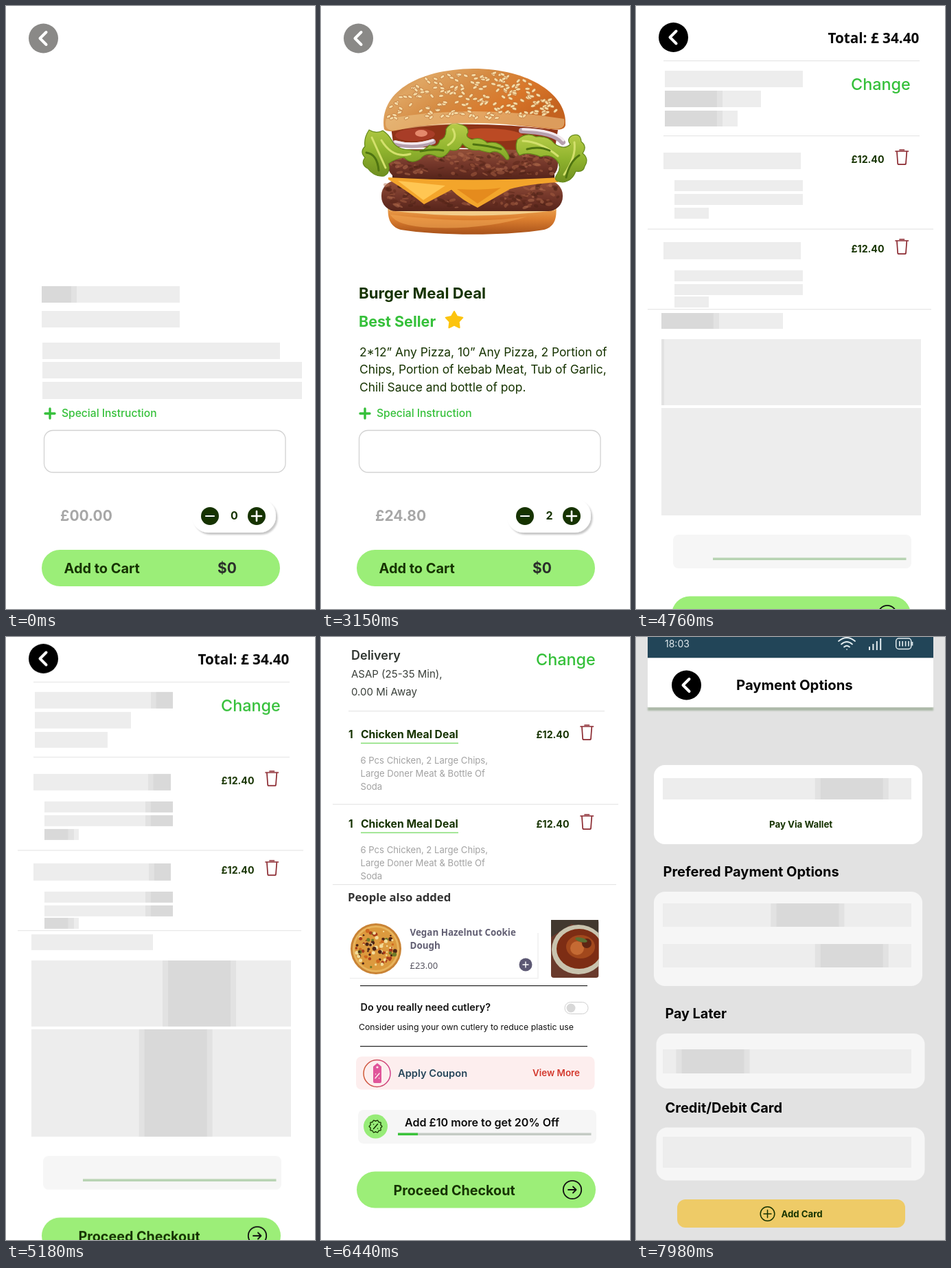
An HTML page that plays this animation: 450x876 px, repeating every 8000 ms.

```html
<!DOCTYPE html>
<html lang="en">
<head>
<meta charset="utf-8">
<title>Food order flow</title>
<style>
html, body { margin: 0; width: 100%; height: 100%; overflow: hidden; background: #fff; }
body > svg { display: block; width: 450px; height: 876px; font-family: Inter, sans-serif; }
.mid { text-anchor: middle; }
.line { fill: none; stroke-linecap: round; stroke-linejoin: round; }
.step, .soft { animation-duration: 8s; animation-iteration-count: infinite; }
.step { animation-timing-function: step-end; }
.soft { animation-timing-function: linear; }
.sweep { animation: sweep 800ms linear infinite; }
.press { transform-box: fill-box; transform-origin: center; }
@keyframes sweep { from { transform: translateX(-110px); } to { transform: translateX(450px); } }
@keyframes product { 0% { opacity: 1; } 56%, 100% { opacity: 0; } }
@keyframes cart { 0% { opacity: 0; } 56% { opacity: 1; } 95.5%, 100% { opacity: 0; } }
@keyframes pay { 0% { opacity: 0; } 95.5%, 100% { opacity: 1; } }
@keyframes itemWait { 0%, 8.75% { opacity: 1; } 10.5%, 100% { opacity: 0; } }
@keyframes itemReady { 0%, 8.75% { opacity: 0; } 10.5%, 100% { opacity: 1; } }
@keyframes cartWait { 0%, 70% { opacity: 1; } 72.5%, 100% { opacity: 0; } }
@keyframes cartReady { 0%, 70% { opacity: 0; } 72.5%, 100% { opacity: 1; } }
@keyframes scroll { 0%, 62.625% { transform: translateY(81px); } 74.875%, 100% { transform: none; } }
@keyframes countZero { 0% { opacity: 1; } 18.4%, 100% { opacity: 0; } }
@keyframes countOne { 0% { opacity: 0; } 18.4% { opacity: 1; } 28.9%, 100% { opacity: 0; } }
@keyframes countTwo { 0% { opacity: 0; } 28.9%, 100% { opacity: 1; } }
@keyframes unpaid { 0% { opacity: 1; } 46.25%, 100% { opacity: 0; } }
@keyframes paid { 0% { opacity: 0; } 46.25%, 100% { opacity: 1; } }
@keyframes tap { 0% { opacity: 1; } 15.75% { opacity: .8; } 18.4% { opacity: 1; } 26.25% { opacity: .8; } 28.9%, 100% { opacity: 1; } }
@keyframes addPress { 0%, 51% { fill: #9bee78; transform: none; } 52.5%, 100% { fill: #a8ef7c; transform: scale(1.006); } }
@keyframes payPress { 0%, 93% { fill: #9cee78; transform: none; } 94.5%, 100% { fill: #a8ef7c; transform: scale(1.006); } }
</style>
</head>
<body>
<script>
const dark = '#163300', green = '#35c03a', pale = '#ededed';

const text = (x, y, size, weight, fill, str, attrs = '') =>
  `<text x="${x}" y="${y}" font-size="${size}" font-weight="${weight}" fill="${fill}" ${attrs}>${str}</text>`;
const noto = 'font-family="Noto Sans, sans-serif"';
const rect = (x, y, w, h, fill, r = 0, attrs = '') =>
  `<rect x="${x}" y="${y}" width="${w}" height="${h}" rx="${r}" fill="${fill}" ${attrs}/>`;
const circle = (x, y, r, fill, attrs = '') => `<circle cx="${x}" cy="${y}" r="${r}" fill="${fill}" ${attrs}/>`;
const oval = (x, y, rx, ry, fill, turn = 0, attrs = '') =>
  `<ellipse rx="${rx}" ry="${ry}" fill="${fill}" transform="translate(${x} ${y}) rotate(${turn})" ${attrs}/>`;
const line = (d, color, width) => `<path class="line" d="${d}" stroke="${color}" stroke-width="${width}"/>`;
const path = (d, fill, attrs = '') => `<path d="${d}" fill="${fill}" ${attrs}/>`;
const rule = (x1, x2, y, color = '#e6e6e6') => rect(x1, y, x2 - x1, 1.2, color);
const anim = (name, body, kind = 'step') => `<g class="${kind}" style="animation-name:${name}">${body}</g>`;
const back = (x, y, fill) => circle(x, y, 21.5, fill) + line(`M${x + 4} ${y - 9}l-9 9 9 9`, '#fff', 4);
const cross = (x, y, r, color, width) => line(`M${x - r} ${y}h${2 * r}M${x} ${y - r}v${2 * r}`, color, width);

let seed = 7;
const random = () => (seed = (seed * 16807) % 2147483647) / 2147483647;
const scatter = (count, draw) => Array.from({ length: count }, draw).join('');

// Placeholder bar: its highlight stands at offset pos at the given time.
function bar(x, y, w, h, pos, time) {
  const delay = (time % 800) - (pos + 110) / 560 * 800 - 800;
  return `<svg x="${x}" y="${y}" width="${w}" height="${h}" overflow="hidden">${rect(0, 0, w, h, pale)}
    <g class="sweep" style="animation-delay:${delay.toFixed(0)}ms">${rect(0, 0, 107, h, '#e2e2e2')}${rect(8, 0, 91, h, '#d9d9d9')}</g></svg>`;
}
const bars = (list, time) => list.map(b => bar(...b, time)).join('');

function patty(x, y, w, h) {
  const spots = scatter(150, () => oval(x + 6 + random() * (w - 12), y + 5 + random() * (h - 10),
    2 + random() * 4, 1 + random() * 1.8, ['#5a2617', '#a85f42', '#4a1f14', '#b5704f'][random() * 4 | 0],
    random() * 60 - 30, 'opacity=".5"'));
  return rect(x, y, w, h, 'url(#meat)', h / 2.1) + spots;
}

function leaf(d) {
  return path(d, 'url(#leaf)', 'stroke="#64891a" stroke-width="1.2" stroke-linejoin="round"');
}

function burger() {
  const seeds = scatter(200, () => {
    const a = Math.PI * (1 + random()), r = Math.sqrt(random());
    return oval(222 + Math.cos(a) * r * 124, 163 + Math.sin(a) * r * 69, 3.6, 2, '#f6dca6',
      random() * 100 - 50, 'stroke="#b5662a" stroke-width=".6"');
  });
  return path('M98 286C96 306 99 320 116 325C170 334 272 334 325 325C342 320 344 306 342 286Z', 'url(#base)')
    + path('M98 288Q220 306 342 288L341 297Q220 312 99 297Z', '#f3cd8a')
    + path('M101 303Q220 318 300 306Q240 325 160 322Q110 320 101 303Z', '#f0a552', 'opacity=".6"')
    + rect(104, 235, 236, 40, '#4c2013')
    + patty(88, 254, 264, 44)
    + patty(97, 208, 248, 43)
    + path('M98 249Q220 256 350 249L345 256Q300 259 275 266L228 293Q205 282 190 267L150 288Q128 270 98 252Z', '#f3a52b')
    + path('M112 254L181 261 149 282Z', '#ffc653') + path('M198 266Q235 268 262 264L228 287Z', '#e58b1d')
    + path('M102 177Q222 165 345 180L340 212Q222 205 106 205Z', '#8f3317')
    + oval(137, 187, 29, 9, '#a83d27', -2) + oval(146, 185, 9, 5, '#e4896c', 0)
    + oval(250, 187, 45, 9, '#bb4a24', 3)
    + line('M108 199Q135 207 163 197M292 181Q340 183 352 198', '#b7a0ae', 8)
    + line('M108 197Q135 204 163 195M294 179Q340 180 353 195M320 203Q345 208 362 203', '#f3e9ee', 3.5)
    + leaf('M70 180Q80 186 90 181Q98 186 103 195Q110 209 130 209Q148 214 158 202Q170 207 173 195Q183 192 182 179Q190 166 202 172Q215 174 214 184Q209 190 220 194Q232 189 242 199Q260 195 270 211Q278 224 270 223Q258 207 246 213Q235 211 230 209Q215 211 206 200Q200 213 188 209Q178 225 165 217Q153 212 145 222Q131 231 121 220Q108 222 98 229Q102 242 92 247Q78 249 68 236Q57 230 64 220Q56 212 64 204Q62 192 70 180Z')
    + leaf('M286 194Q300 182 313 190Q331 188 340 200Q354 210 363 201Q357 193 366 188Q378 184 379 197Q388 204 381 214Q391 222 384 233Q382 242 371 240Q366 254 352 256Q336 255 344 244Q351 233 343 224Q333 214 320 219Q301 211 289 217Q281 208 286 194Z')
    + line('M74 191Q84 213 94 235M88 195Q104 222 130 215M192 179Q200 193 185 202M294 196Q320 197 345 218M369 198Q372 219 354 245', '#d3e06c', 3)
    + line('M66 213Q82 215 84 239M145 211Q165 207 178 210M222 201Q245 203 262 208M300 208Q318 203 333 210M376 217Q362 226 357 249', '#4f7411', 3)
    + path('M92 179C84 127 139 92 222 91C304 91 360 130 356 173C354 185 330 177 300 175Q222 165 145 174C118 177 100 187 92 179Z', 'url(#bun)')
    + path('M95 164Q220 142 354 164Q358 182 334 178Q222 163 111 180Q90 184 95 164Z', '#edc485', 'opacity=".6"')
    + seeds;
}

function productPage() {
  const star = Array.from({ length: 10 }, (_, i) => {
    const a = i * Math.PI / 5 - Math.PI / 2, r = i % 2 ? 7 : 13;
    return `${194 + r * Math.cos(a)},${456.7 + r * Math.sin(a)}`;
  }).join(' ');
  const skeleton = bars([[52, 407, 201, 24, -57], [52, 443, 201, 24, -110], [53, 489, 346, 24, 420],
    [53, 517, 378, 24, 400], [53, 546, 378, 25, 380]], 0);
  const ready = burger()
    + text(55, 425, 22.2, 700, dark, 'Burger Meal Deal')
    + text(55, 466, 21.5, 700, green, 'Best Seller')
    + `<polygon points="${star}" fill="#fcc40f" stroke="#fcc40f" stroke-width="2" stroke-linejoin="round"/>`
    + ['2*12” Any Pizza, 10” Any Pizza, 2 Portion of', 'Chips, Portion of kebab Meat, Tub of Garlic,',
      'Chili Sauce and bottle of pop.'].map((s, i) => text(56, 508.5 + i * 25.5, 17.4, 400, dark, s)).join('');
  const price = s => text(79, 748, 21, 700, '#a7a7a7', s);
  const count = n => text(332.5, 745.5, 16, 700, dark, n, 'class="mid"');
  return back(54.5, 47, '#8a8987')
    + anim('itemWait', skeleton, 'soft') + anim('itemReady', ready, 'soft')
    + cross(64, 592, 7, green, 3.4) + text(81, 596.5, 15.6, 500, green, 'Special Instruction')
    + rect(55.5, 616.5, 351.5, 61, '#fff', 13, 'stroke="#d2d2d2" stroke-width="1.3"')
    + rect(271, 716, 122, 49, '#fff', 24, 'filter="url(#shadow)"')
    + circle(297, 741, 13, dark) + line('M291 741h12', '#fff', 2.2)
    + anim('tap', circle(365, 741, 13, dark)) + cross(365, 741, 7, '#fff', 2.6)
    + anim('countZero', price('£00.00') + count(0))
    + anim('countOne', price('£12.40') + count(1))
    + anim('countTwo', price('£24.80') + count(2))
    + rect(52, 790, 347, 53, '#9bee78', 26.5, 'class="soft press" style="animation-name:addPress"')
    + text(84.5, 824, 19.9, 700, dark, 'Add to Cart')
    + anim('unpaid', text(308, 824, 21, 700, '#2b2f2b', '$0'))
    + anim('paid', text(308.5, 824, 20.3, 700, '#2b2f2b', '$22.80'));
}

const trash = y => line(`M378 ${y - 9}h18.5M384 ${y - 11}h6.5M380 ${y - 8}l1.2 17q.2 1.2 1.4 1.2h9q1.2 0 1.4-1.2l1.3-17`, '#8b2930', 1.7);

function meal(y) {
  return text(40, y + 5.5, 15.5, 700, dark, '1') + text(58, y + 5.5, 15.7, 700, dark, 'Chicken Meal Deal')
    + rect(58, y + 12.5, 142, 1.6, '#8be07c')
    + ['6 Pcs Chicken, 2 Large Chips,', 'Large Doner Meat &amp; Bottle Of', 'Soda']
      .map((s, i) => text(57.5, y + 43 + i * 19.2, 13.1, 400, '#a2a2a2', s)).join('');
}

function pizza() {
  const toppings = scatter(90, () => {
    const a = random() * 7, r = Math.sqrt(random()) * 29;
    return circle(80 + Math.cos(a) * r, 453 + Math.sin(a) * r, 1 + random() * 2,
      ['#a83c1b', '#4c2416', '#f3dc9a', '#6f7a28', '#d06a20'][random() * 5 | 0]);
  });
  return circle(80, 453, 37, '#c98335') + circle(80, 453, 34, '#e8b45c') + circle(80, 453, 31, '#dc9a3e') + toppings;
}

function soup() {
  return `<svg x="335" y="411" width="69.5" height="84">${rect(0, 0, 69.5, 84, '#6a3a2c', 4)}`
    + path('M0 0H69V22L30 6 0 25Z', '#42382f') + oval(40, 43, 39, 36, '#c9c3ae') + oval(41, 42, 33, 29, '#7d2d14')
    + oval(43, 39, 21, 17, '#a2481c') + circle(38, 41, 10, '#c56a33') + circle(52, 34, 7, '#5e2413')
    + oval(44, 29, 9, 3, '#5a7034', 15) + '</svg>';
}

function cartPage() {
  const skeleton = bars([[42, 13, 201, 24, 168], [42, 42, 140, 24, 270], [42, 71, 106, 23, 270],
    [40, 132, 200, 24, 166], [56, 172, 187, 16, 146], [56, 192, 187, 16, 146], [56, 212, 50, 16, -65],
    [40, 262, 200, 25, 167], [56, 303, 187, 16, 146], [56, 323, 187, 16, 146], [56, 341, 50, 16, -65],
    [37, 365, 177, 23, 270], [37, 403, 378, 96, 190], [37, 503, 378, 156, 156]], 5180);
  const offer = rect(54, 687, 347, 49, '#f6f6f6', 8);
  const badge = Array.from({ length: 41 }, (_, i) => {
    const a = i / 40 * 2 * Math.PI, r = 8.5 + .9 * Math.cos(10 * a);
    return `${i ? 'L' : 'M'}${79.5 + r * Math.cos(a)} ${711 + r * Math.sin(a)}`;
  }).join('');
  const ready = text(44, 33, 18, 600, '#2f3530', 'Delivery')
    + text(44, 59, 15, 400, '#3b403b', 'ASAP (25-35 Min),') + text(44, 84.5, 15, 400, '#3b403b', '0.00 Mi Away')
    + meal(141) + meal(271)
    + text(39, 383.5, 16.7, 700, '#333', 'People also added', noto)
    + rect(42, 495, 275, 1.5, '#f0f0f0') + rect(315, 430, 2, 66, '#f3f3f3')
    + pizza() + soup()
    + text(129.5, 434, 13.4, 600, '#625f73', 'Vegan Hazelnut Cookie', noto)
    + text(129.5, 452.5, 13.4, 600, '#625f73', 'Dough', noto)
    + text(129.5, 482, 13, 400, '#55535f', '£23.00', noto)
    + circle(298, 476, 9.5, '#5c5873') + cross(298, 476, 4, '#fff', 1.4)
    + rule(57, 388, 506, '#222') + rule(57, 388, 594, '#222')
    + text(57.5, 543, 14.4, 600, '#111', 'Do you really need cutlery?')
    + rect(355, 530.5, 34, 17, '#fff', 8.5, 'stroke="#cfcfcf"') + circle(364, 539, 6.5, '#d8d8d8')
    + text(55, 570.5, 12.3, 400, '#111', 'Consider using your own cutlery to reduce plastic use')
    + rect(51, 609.5, 347.5, 48, '#fdeeee', 8)
    + circle(81.5, 634, 19.5, 'none', 'stroke="url(#ring)" stroke-width="1.5"')
    + path('M82 619l6 5v22q0 2-2 2h-8q-2 0-2-2v-22Z', '#e0559a') + circle(82, 625, 1.6, '#fdeeee')
    + line('M79 641l6-7M79.5 635h.1M84.5 641h.1', '#fdeeee', 1.5)
    + text(112, 639, 14.7, 600, '#26465a', 'Apply Coupon')
    + text(308, 638, 13.4, 600, '#d3372c', 'View More')
    + offer + circle(79.5, 711, 17.5, '#97ec78') + line(badge + 'Z', dark, 1.3)
    + line('M76.5 714.5l6-7M76.5 708h.1M82.5 714h.1', dark, 1.6)
    + text(122, 710.5, 16.1, 600, '#0a0a0a', 'Add £10 more to get 20% Off')
    + rect(112, 720.5, 281.5, 3.5, '#c4cbc4') + rect(112, 720.5, 29, 3.5, '#3cc43c');
  const body = back(54.5, -35.5, '#000')
    + text(279.5, -27, 20.7, 700, '#0a0a0a', 'Total: £ 34.40', noto)
    + text(313, 40.5, 23.4, 500, green, 'Change')
    + rule(40, 413, -2) + rule(40, 413, 107) + rule(17, 433, 242.5) + rule(17, 430, 359)
    + [141, 271].map(y => text(313.5, y + 5.5, 14.2, 700, dark, '£12.40') + trash(y - 2)).join('')
    + anim('cartWait', skeleton + offer + rect(112, 720.5, 281.5, 3.5, '#b7d3b2'), 'soft')
    + anim('cartReady', ready, 'soft')
    + rect(52, 776.5, 348, 53, '#9cee78', 26.5, 'class="soft press" style="animation-name:payPress"')
    + text(105.5, 810.5, 19.7, 700, dark, 'Proceed Checkout')
    + circle(366, 803, 13.2, 'none', 'stroke="#111" stroke-width="1.8"')
    + line('M360 803h11M367 798.5l4.5 4.5-4.5 4.5', '#111', 1.8);
  return rect(0, 0, 450, 876, '#fff') + anim('scroll', body, 'soft');
}

function payPage() {
  const card = (x, y, h, fill = '#f6f6f6') => rect(x, y, 391, h, fill, 16);
  const signal = [0, 1, 2, 3].map(i => rect(339 + i * 5.4, 14 - i * 4, 2, 5 + i * 4, '#e4edf0')).join('');
  const cells = [0, 1, 2, 3].map(i => rect(383 + i * 4.4, 6, 1.6, 7.5, '#e4edf0')).join('');
  return rect(0, 0, 450, 876, '#e2e2e2')
    + rect(17, 102, 416, 5, '#aab7a6', 0, 'filter="url(#blur)"')
    + rect(17, 0, 416, 30.5, '#224558') + rect(17, 30.5, 416, 71.5, '#fff')
    + text(42, 14.5, 14, 400, '#dfe8ec', '18:03')
    + line('M295 6q12-10 24 0M299 10.5q8-7 16 0M303 14.5q4-3.5 8 0M307 18h.1', '#e4edf0', 1.7)
    + signal + rect(378.7, 2, 22, 15.5, 'none', 4, 'stroke="#e4edf0" stroke-width="1.5"') + cells
    + rect(401.5, 7, 1.8, 5.5, '#e4edf0')
    + back(73.5, 70, '#000') + text(146, 77, 20.3, 700, '#050505', 'Payment Options')
    + card(26, 186, 115, '#fff') + card(26, 370, 137) + card(29.5, 576, 80) + card(29.5, 712.5, 77)
    + bars([[39, 205, 362, 31, 221], [39, 387, 362, 34, 157], [39, 446, 362, 34, 221],
      [39, 599, 362, 35, 19], [39, 726, 362, 45, 400]], 7980)
    + text(194, 276.5, 13.3, 700, dark, 'Pay Via Wallet')
    + text(39.5, 348, 20, 700, '#050505', 'Prefered Payment Options')
    + text(42.5, 554, 19.7, 700, '#050505', 'Pay Later')
    + text(42.5, 690.5, 20, 700, '#050505', 'Credit/Debit Card')
    + rect(60, 817, 332, 41, '#eecb67', 12)
    + circle(191.5, 838, 10.3, 'none', `stroke="${dark}" stroke-width="1.5"`) + cross(191.5, 838, 5.5, dark, 1.5)
    + text(211.5, 843, 13.2, 700, dark, 'Add Card');
}

const gradient = (id, attrs, ...colors) => `<linearGradient id="${id}" ${attrs}>${colors.map((c, i) =>
  `<stop offset="${i / (colors.length - 1)}" stop-color="${c}"/>`).join('')}</linearGradient>`;
const down = 'x2="0" y2="1"';

document.body.innerHTML = `<svg viewBox="0 0 450 876" xmlns="http://www.w3.org/2000/svg"><defs>
  ${gradient('bun', 'x2="1" y2=".5"', '#c98442', '#dfa562', '#d58a41', '#d9772a', '#c4621f')}
  ${gradient('base', down, '#f0b260', '#dd8030', '#a8521a')}
  ${gradient('meat', down, '#935039', '#74372a', '#56241a')}
  ${gradient('leaf', down, '#b7cc48', '#90b42e', '#708f20')}
  ${gradient('ring', 'x2="1" y2="0"', '#cf5a35', '#cf3f8a')}
  <filter id="shadow" x="-10%" y="-20%" width="125%" height="150%"><feDropShadow dx="2.5" dy="3" stdDeviation="1.3" flood-color="#000" flood-opacity=".22"/></filter>
  <filter id="blur" x="-2%" y="-100%" width="104%" height="300%"><feGaussianBlur stdDeviation="1"/></filter>
  </defs>${anim('product', productPage())}${anim('cart', cartPage())}${anim('pay', payPage())}</svg>`;
</script>
</body>
</html>
```
